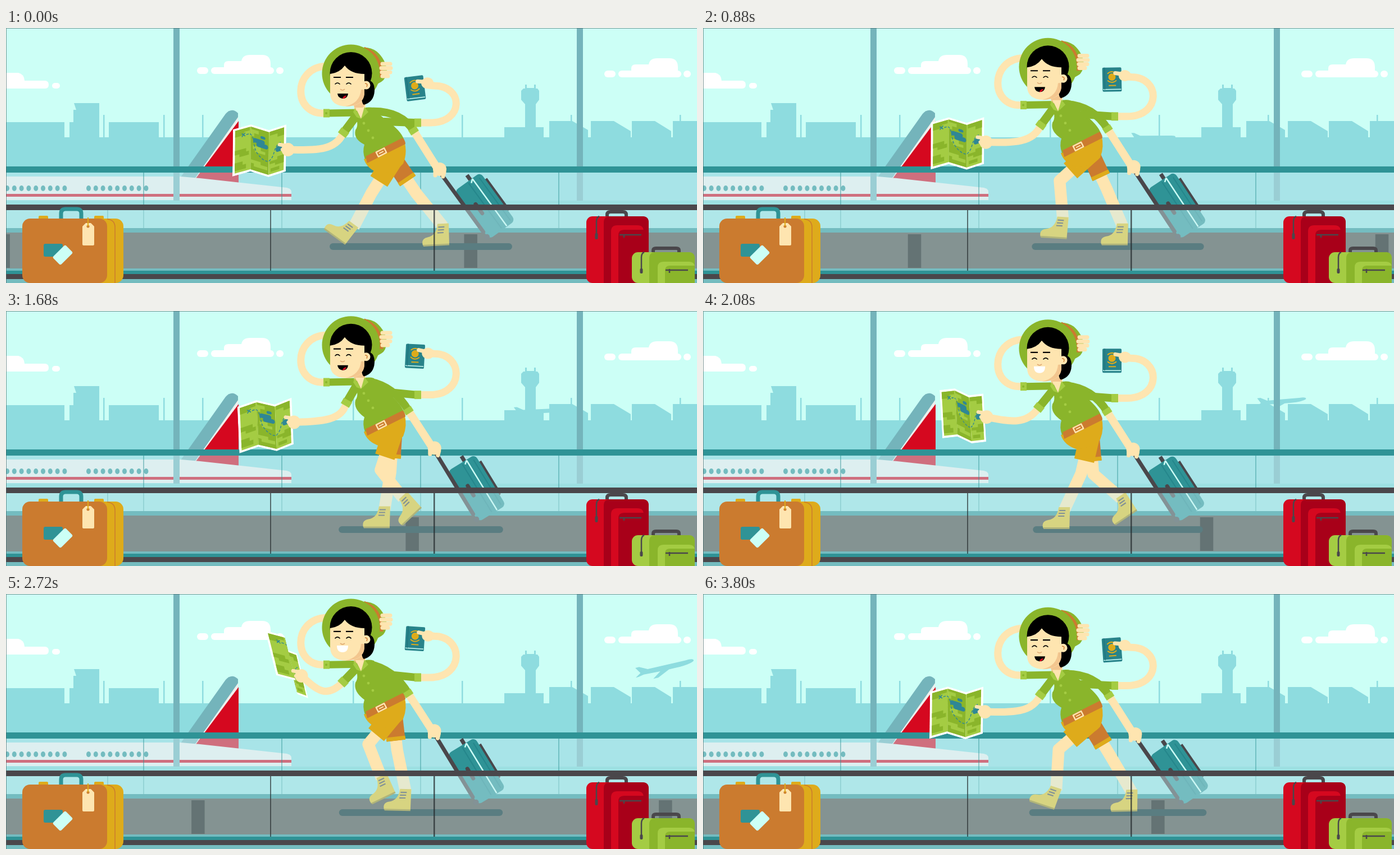
An HTML page that plays this animation: 1230x455 px, repeating every 3.84 s.

```html
<!DOCTYPE html>
<html lang="en">
<head>
<meta charset="utf-8">
<title>Airport walk</title>
<style>
html,body{margin:0;width:100%;height:100%;overflow:hidden;background:#ccfff6}
svg{display:block;width:100vw;height:100vh}
.haze{fill:#8edcdf}.teal{fill:#2f9396}.dark{fill:#4a474b}.skin{fill:#fee5b0}
.green{fill:#8ab52b}.lime{fill:#a4cc43}.gold{fill:#deab1b}.brown{fill:#cb7b2f}
.red{fill:#d5081f}.wine{fill:#a80019}.glass{fill:#c8eef1;opacity:.45}.white{fill:#fff}
.ln{fill:none;stroke-linejoin:round}
.sk{stroke:#fee5b0}.gr{stroke:#8ab52b}.li{stroke:#a4cc43}.dk{stroke:#4a474b}
.round{stroke-linecap:round}
</style>
</head>
<body>
<svg viewBox="0 0 1230 455" preserveAspectRatio="none">
<defs>
  <g id="cloud" class="white">
    <rect x="340" y="70" width="20" height="12" rx="6"/><rect x="365" y="70" width="112" height="12" rx="6"/>
    <path d="M388 72V66Q388 59 396 59H419Q421 48 434 48H456Q471 48 471 64V72Z"/>
    <rect x="481" y="70" width="13" height="12" rx="6"/>
  </g>
  <g id="art">
    <rect width="96" height="84" fill="#fff"/>
    <rect class="lime" x="4" y="4" width="88" height="76"/>
    <rect class="green" x="32" y="4" width="32" height="76"/>
    <g class="green">
      <path d="M4 4H30V10H20V16H4ZM4 40H24V46H29V53H12V48H4ZM4 62H18V68H24V76H4Z"/>
      <path d="M66 4H92V17H80V11H66ZM92 56V66H76V62H66V57H80V52H92ZM68 70H84V76H68Z"/>
    </g>
    <path class="lime" d="M32 8H46V14H38V20H32ZM36 36H50V42H58V47H40V42H36ZM32 62H50V67H62V73H38V68H32Z"/>
    <g fill="#2f8795">
      <rect x="36" y="22" width="21" height="8" rx="4"/><rect x="42" y="28" width="21" height="8" rx="4"/>
      <rect x="49" y="15" width="9" height="5" rx="2.5"/><rect x="77" y="34" width="15" height="10" rx="4"/>
    </g>
    <path class="ln" d="M16 12L22 18M22 12L16 18" stroke="#2f8795" stroke-width="1.6"/>
    <path class="ln" d="M24 16C42 14 34 38 44 48C54 60 68 60 73 46C76 36 78 30 88 28" stroke="#2f8795" stroke-width="1.6" stroke-dasharray="4 2.5"/>
  </g>
  <clipPath id="cell"><rect width="32.3" height="84"/></clipPath>
  <g id="boot">
    <path d="M-10 0H10L9 37H-38Q-41 25 -29 23Q-13 21 -10 0Z" fill="#e3bf24"/>
    <path d="M-38 36H9V39H-37Z" fill="#9d8418"/>
    <path class="ln dk" d="M-9 6H2M-10 11H1M-11 16H0" stroke-width="2.2"/>
  </g>
</defs>

<rect width="1230" height="455" fill="#ccfff6"/>
<g class="white">
  <path d="M0 80H22Q32 82 33 94H70Q76 95 76 101Q76 108 70 108H0Z"/><rect x="82" y="98" width="14" height="10" rx="5"/>
</g>
<use href="#cloud"/><use href="#cloud" x="725" y="6"/>
<g class="haze">
  <path id="plane" d="M-52 -11H-45L-31 -4H38Q54 -5 52 0Q44 5 20 5H6L-16 15H-25L-10 5L-40 4L-50 6H-55L-45 0Z"/>
  <path d="M0 168H104V195H113V168H120V146H125L121 134H166V168H166V195H183V168H272V195H0Z"/>
  <path d="M887 177H924V136L917 128V112L921 108H924V101H927V107H940V101H943V108H946L949 112V128L943 136V177H957V195H887Z"/>
  <path d="M967 166H1008L1036 182V195H967ZM1041 166H1082L1112 184V195H1041ZM1114 166H1155L1184 184V195H1114ZM1187 166H1230V195H1187Z"/>
  <g id="poles"></g>
  <rect y="195" width="1230" height="120"/>
</g>

<path d="M311 266L391 153Q402 141 413 152V164L340 268Z" fill="#74b4bb"/>
<path d="M413 159V276H331Z" fill="#eef0ee"/>
<path class="red" d="M414 166V277L338 268Z"/>
<path d="M0 265H311L345 268L500 285Q508 287 508 292V307H0Z" fill="#eef0ee"/>
<rect class="red" y="296" width="508" height="5"/>
<g id="ports" class="teal"></g>
<g fill="#74b4bb"><rect x="298" width="11" height="308"/><rect x="1016" width="11" height="308"/></g>
<rect class="glass" y="258" width="1230" height="50"/>
<rect y="308" width="1230" height="7" fill="#9de0e2"/>
<rect class="teal" y="247" width="1230" height="11"/>
<rect y="325" width="1230" height="33" fill="#9ae2e2"/>
<g fill="#2f9396" opacity=".45">
  <rect x="244" y="258" width="2" height="99"/><rect x="490" y="258" width="2" height="99"/>
  <rect x="737" y="258" width="2" height="99"/><rect x="983" y="258" width="2" height="99"/>
  <rect x="180" y="325" width="2" height="32"/>
</g>
<rect class="teal" y="357" width="1230" height="8"/>
<rect y="365" width="1230" height="64" fill="#4c4943"/>
<rect class="teal" y="429" width="1230" height="26"/>
<g id="posts" fill="#120f0d"><rect y="368" width="23.5" height="60"/><rect x="832" y="368" width="23.5" height="60"/><rect x="-832" y="368" width="23.5" height="60"/></g>
<rect id="shadow" y="384" height="12" rx="6" fill="#002024"/>

<!-- traveller -->
<g id="case">
  <path class="dark" d="M58 -62H122Q128 -62 128 -57V-54H58Z"/>
  <path class="ln dk" d="M33 -36H52" stroke-width="7"/>
  <rect class="teal" x="43" y="-58" width="106" height="57" rx="8"/>
  <path class="ln" d="M44 -40H148M44 -40L49 -34" stroke="#ccfff6" stroke-width="2.5"/>
  <path class="ln" d="M50 -51H144M46 -30H146" stroke="#25868b" stroke-width="2"/>
  <path class="ln dk round" d="M84 -18H104" stroke-width="7"/>
  <path class="ln dk round" d="M0 0H132" stroke-width="7"/>
  <circle class="dark" cx="143" cy="0" r="5"/>
</g>
<path id="legB" class="ln sk" stroke-width="21"/><use id="bootB" href="#boot"/>
<path id="shortB" class="ln" stroke="#cb7b2f" stroke-width="33"/><path id="cuffB" class="ln" stroke="#deab1b" stroke-width="34"/>
<path id="legA" class="ln sk" stroke-width="21"/><use id="bootA" href="#boot"/>
<path id="shortA" class="ln" stroke="#deab1b" stroke-width="36"/>
<g id="hips">
  <path class="gold" d="M637 234L709 202Q715 222 707 242Q692 259 664 259Q643 252 637 234Z"/>
</g>
<path id="caseSleeve" class="ln gr" stroke-width="14"/><path id="caseArm" class="ln sk" stroke-width="14"/><path id="caseCuff" class="ln li" stroke-width="16"/>
<g id="caseHand"><circle class="skin" cx="0" cy="-5" r="12"/><path class="ln sk round" d="M-8 0V6M8 0L6 8" stroke-width="7"/></g>

<g id="hatArm">
  <path class="ln sk" d="M568 152C510 156 510 70 570 68" stroke-width="13"/>
  <path class="ln gr" d="M628 151L572 152" stroke-width="13"/><path class="ln li" d="M576 152H565" stroke-width="15"/>
  <circle class="green" cx="570" cy="152" r="2"/>
</g>
<path id="sleeve" class="ln gr round" stroke-width="15"/>
<g id="neck"><path class="skin" d="M619 128H640V150L632 164L620 148Z"/><path d="M619 138Q634 134 639 124V138Q632 146 622 146Z" fill="#f3c68f"/></g>
<path id="torso" class="green"/>
<g id="chest">
  <path class="skin" d="M622 142H640L632 162Z"/>
  <path class="lime" d="M621 143L632 162L624 159L618 150ZM638 141L645 150L632 162Z"/>
  <g class="lime"><circle cx="637" cy="170" r="2.4"/><circle cx="645" cy="183" r="2.4"/><circle cx="653" cy="196" r="2.4"/></g>
</g>
<g id="belt">
  <path class="brown" d="M640 229L706 196Q711 201 711 207L643 241Z"/>
  <rect class="ln" x="-8" y="-4.5" width="16" height="9" transform="translate(668 222)rotate(-27)" stroke="#fee5b0" stroke-width="2.5"/>
  <path class="ln sk" d="M664 224L672 220" stroke-width="2"/>
</g>
<path id="passSleeve" class="ln gr" stroke-width="14"/><path id="passArm" class="ln sk" stroke-width="13"/><path id="passCuff" class="ln li" stroke-width="15"/>
<g id="pass">
  <rect x="711" y="86" width="34" height="43" rx="2" fill="#28838a"/>
  <path d="M712 125H744" stroke="#ccfff6" stroke-width="1.5"/><path d="M715 86V125" stroke="#1f747c" stroke-width="1.5"/>
  <circle class="gold" cx="728" cy="103" r="6.5"/>
  <path class="ln" d="M720 97Q728 90 736 97M720 109Q728 116 736 109M722 118H735" stroke="#deab1b" stroke-width="2"/>
  <path class="ln sk round" d="M734 96L746 98" stroke-width="7"/><ellipse class="skin" cx="751" cy="101" rx="11" ry="10"/>
</g>

<g id="head">
  <path class="green" d="M628 36Q646 32 660 42Q676 56 678 76Q676 92 668 96L640 112Z"/>
  <path class="ln" d="M637 37Q668 48 668 88" stroke="#cb7b2f" stroke-width="7"/>
  <circle class="green" cx="614" cy="81" r="51.5"/>
  <path d="M632 96Q656 86 656 112Q655 132 637 137Q631 134 632 96Z"/>
  <circle cx="614" cy="80.5" r="37.5"/>
  <path class="skin" d="M577 82Q594 80 603 67Q614 82 638 82V116Q636 139 606 140Q577 139 577 116Z"/>
  <path d="M638 110V118Q636 139 604 140Q630 134 632 110Z" fill="#f3c68f"/>
  <circle class="skin" cx="641" cy="102" r="7.5"/><path class="ln" d="M639 99Q645 99 642 105" stroke="#cb7b2f" stroke-width="1.5"/>
  <path class="ln" d="M583 88H596M605 88H618" stroke="#000" stroke-width="2.2"/>
  <path class="ln round" d="M586 100Q590 96 594 100M606 100Q610 96 614 100" stroke="#000" stroke-width="1.6"/>
  <path class="ln" d="M595 109Q599 113 603 109" stroke="#e0ab75" stroke-width="1.6"/>
  <g id="laugh"><path d="M590 117H609Q608 126 599 126Q591 125 590 117Z"/><path class="red" d="M599 125Q602 120 606 121Q604 126 599 126Z"/></g>
  <path id="smile" class="white" d="M589 113H609Q609 125 599 125Q589 125 589 113Z"/>
</g>
<path id="fingers" class="ln sk round" d="M670 64H684M668 71.5H685M669 79H684M670 86H680" stroke-width="7"/>

<g id="map"></g>
<path id="mapArm" class="ln sk" stroke-width="13"/><path id="mapCuff" class="ln li" stroke-width="17"/>
<g id="mapHand"><ellipse class="skin" cx="0" cy="0" rx="11.5" ry="12"/><path class="ln sk round" d="M-3 -7L-15 -9M-4 -1L-10 0" stroke-width="6.5"/></g>

<!-- front glass and rails -->
<rect class="glass" y="325" width="1230" height="108"/>
<g fill="#242a2c"><rect x="470" y="325" width="2" height="108" opacity=".65"/><rect x="761" y="325" width="2.5" height="108" opacity=".75"/></g>
<rect class="dark" y="315" width="1230" height="10"/>
<rect class="teal" y="433" width="1230" height="6"/><rect class="dark" y="439" width="1230" height="9"/><rect y="448" width="1230" height="7" fill="#74bcbf"/>

<!-- luggage -->
<rect class="gold" x="130" y="340" width="79" height="115" rx="14"/><path class="ln" d="M180 341Q194 342 194 356V455" stroke="#cb7b2f" stroke-width="1.5"/>
<path class="gold" d="M58 342V337Q58 335 60 335H73Q75 335 75 337V342ZM157 342V337Q157 335 159 335H172Q174 335 174 337V342Z"/>
<path class="ln" d="M98 341V331Q98 323 106 323H126Q134 323 134 331V341" stroke="#2f9396" stroke-width="7"/>
<rect class="brown" x="29" y="340" width="151" height="115" rx="14"/>
<rect class="teal" x="67" y="385" width="34" height="23" rx="3"/>
<rect x="-16" y="-10" width="32" height="20" rx="3" transform="translate(101 405)rotate(-45)" fill="#ccfff6"/>
<path class="skin" d="M136 354L142 348H151L157 354V386Q157 388 155 388H138Q136 388 136 386Z"/>
<circle class="brown" cx="146" cy="354" r="2.5"/><path class="ln" d="M146 338V354" stroke="#deab1b" stroke-width="2"/>
<path class="ln dk" d="M1070 337V333Q1070 328 1076 328H1098Q1104 328 1104 333V337" stroke-width="6"/>
<rect class="red" x="1033" y="336" width="111" height="119" rx="11"/>
<path class="wine" d="M1064 455V347Q1064 336 1075 336H1133Q1144 336 1144 347V455Z"/>
<path class="red" d="M1077 455V363Q1077 352 1088 352H1124Q1135 352 1135 363V455Z"/>
<path class="wine" d="M1090 455V370Q1090 360 1100 360H1135V455Z"/>
<path class="ln dk" d="M1056 336Q1051 338 1051 346V376M1092 369H1131M1100 369V374" stroke-width="2.5"/><rect class="dark" x="1048.5" y="366" width="5" height="11" rx="2"/>
<path class="ln dk" d="M1152 401V397Q1152 393 1157 393H1193Q1198 393 1198 397V401" stroke-width="6"/>
<rect class="lime" x="1114" y="400" width="112" height="55" rx="11"/>
<path class="green" d="M1145 455V411Q1145 400 1156 400H1215Q1226 400 1226 411V455Z"/>
<path class="lime" d="M1160 455V427Q1160 417 1170 417H1216Q1226 417 1226 427V455Z"/>
<path class="green" d="M1173 455V433Q1173 424 1182 424H1226V455Z"/>
<path class="ln dk" d="M1136 400Q1131 402 1131 409V436M1174 432H1214M1181 430V437" stroke-width="2.5"/><rect class="dark" x="1128.5" y="429" width="5" height="9" rx="2"/>
<path d="M0 .5H1230M.5 0V455" stroke="#4f6f70" stroke-width="1" opacity=".7"/>
</svg>
<script>
const LOOP = 3840, STRIDE = 960;
const el = id => document.getElementById(id);
const set = (id, name, v) => el(id).setAttribute(name, v);
const draw = (id, d) => set(id, 'd', d);
const move = (id, x, y, extra = '') => set(id, 'transform', `translate(${x} ${y})${extra}`);
const line = (a, b) => `M${a}L${b}`;
const mix = (a, b, f) => a.map((v, i) => v + (b[i] - v) * f);
// point at distance d from a towards b
const reach = (a, b, d) => mix(a, b, d / Math.hypot(b[0] - a[0], b[1] - a[1]));

// monotone cubic through keys [time, ...values]
function track(keys, t, loop) {
  const n = keys.length;
  const at = j => {
    if (!loop) return keys[Math.max(0, Math.min(n - 1, j))];
    const c = Math.floor(j / n), k = keys[j - c * n];
    return [k[0] + c * loop, ...k.slice(1)];
  };
  let i = 0;
  while (i < n - 1 && keys[i + 1][0] <= t) i++;
  const a = at(i), b = at(i + 1), h = b[0] - a[0];
  if (!h) return a.slice(1);
  const u = (t - a[0]) / h;
  const slope = (j, d) => {
    const p = at(j - 1), q = at(j), r = at(j + 1);
    const l = (q[d] - p[d]) / (q[0] - p[0]), m = (r[d] - q[d]) / (r[0] - q[0]);
    return l * m > 0 ? 2 * l * m / (l + m) : 0;
  };
  return a.slice(1).map((v, k) => {
    const d = k + 1, w = b[d] - v;
    const s = h * slope(i, d), e = h * slope(i + 1, d);
    return v + u * (s + u * (3 * w - 2 * s - e + u * (s + e - 2 * w)));
  });
}

const bob = [[0, 0], [160, .64], [290, 1], [320, .96], [440, .27]];
// time, knee, ankle, boot angle
const step = [
  [0, 650, 295, 619, 350, 36], [160, 673, 290, 643, 350, 0], [280, 690, 285, 692, 348, 0],
  [320, 696, 278, 711, 348, 1], [440, 727, 292, 763, 349, -1], [480, 731, 296, 778, 349, -3],
  [640, 695, 291, 744, 329, -34], [760, 654, 278, 687, 329, -45], [800, 645, 268, 669, 324, -26],
  [920, 633, 277, 629, 345, 18]
];
// four top corners, side vector, cuff, bend, hand
const far = [404, 181, 436, 172, 468, 182, 499, 172, -1, 84, 600, 188, 586, 219, 502, 217];
const near = [425, 202, 457, 189, 490, 195, 519, 183, 9, 83, 609, 192, 606, 220, 525, 226];
const read = [461, 90, 495, 99, 499, 124, 518, 131, 20, 80, 599, 183, 570, 212, 526, 171];
const fling = far.map((v, i) => i < 8 && i % 2 == 0 ? v - 57 : i == 14 ? v - 54 : i == 12 ? v - 12 : v);
const reading = [
  [0, ...far], [480, ...near], [960, ...far],
  [1240, 431, 192, 457, 183, 483, 193, 511, 184, 4, 87, 607, 204, 598, 231, 514, 227],
  [1440, ...near], [1900, ...far],
  [2080, 421, 158, 448, 155, 473, 167, 499, 164, 5, 86, 597, 190, 576, 220, 505, 206],
  [2400, ...read], [3360, ...read], [3560, ...fling], [3780, ...far]
];
const flight = [
  [0, 668, 203, 0, .72], [480, 741, 198, 0, .74], [1240, 860, 192, -1, .77],
  [2080, 1030, 161, -5, .83], [2720, 1173, 131, -13, 1], [3040, 1262, 106, -15, 1.06], [3840, 1500, 30, -15, 1.1]
];

el('poles').innerHTML = [174, 281, 350, 618, 812, 1006, 1200].map(x => `<rect x="${x - 1}" y="155" width="2.5" height="42"/>`).join('');
el('ports').innerHTML = Array.from({length: 18}, (_, i) =>
  `<ellipse cx="${i % 9 * 12.8 + (i < 9 ? 2 : 147)}" cy="286" rx="4" ry="5"/>`).join('');
el('map').innerHTML = [2, 1, 0].map(i =>
  `<g id="fold${i}"><g clip-path="url(#cell)"><use href="#art" x="${-32 * i}"/></g></g>`).join('');

function leg(side, t, hip) {
  const [kx, ky, ax, ay, r] = track(step, t % STRIDE, STRIDE);
  const knee = [kx, ky], cuff = reach(hip, knee, 47);
  draw('leg' + side, `M${hip}L${knee}L${ax} ${ay + 5}`);
  move('boot' + side, ax, ay, `rotate(${r})`);
  draw('short' + side, line(hip, cuff));
  if (side == 'B') draw('cuffB', line(reach(hip, knee, 40), cuff));
}

function mapArm(t, dy, shoulder) {
  const p = track(reading, t, LOOP), pt = i => [p[i], p[i + 1] + dy];
  for (let i = 0; i < 3; i++) {
    const a = pt(2 * i), b = pt(2 * i + 2);
    set('fold' + i, 'transform', `matrix(${(b[0] - a[0]) / 32} ${(b[1] - a[1]) / 32} ${p[8] / 84} ${p[9] / 84} ${a})`);
  }
  const cuff = pt(10), bend = pt(12), hand = pt(14);
  draw('sleeve', line(shoulder, reach(cuff, shoulder, 6)));
  draw('mapCuff', line(reach(cuff, shoulder, 7), reach(cuff, shoulder, -4)));
  draw('mapArm', `M${cuff}C${bend} ${mix(bend, hand, .4)} ${hand}`);
  move('mapHand', ...hand);
}

function render(t) {
  const k = track(bob, t % 480, 480)[0];
  const top = -25 * k, low = -20 * k;
  const [px, py, pr, ps] = track(flight, t);
  move('plane', px, py, `rotate(${pr})scale(${ps})`);
  move('posts', (815 + t * 1664 / LOOP) % 832, 0);
  set('shadow', 'x', 576 + 17.5 * k);
  set('shadow', 'width', 325 - 35 * k);

  const hip = [689, 234 + low];
  leg('B', t + STRIDE / 2, hip);
  leg('A', t, hip);
  move('hips', 0, low);
  move('belt', 0, low);
  move('chest', 0, top);
  draw('torso', `M619 ${150 + top}Q640 ${138 + top} 655 ${143 + top}C664 ${160 + top} 700 ${174 + low} 709 ${200 + low}
    L639 ${234 + low}Q634 ${220 + low} 638 ${208 + low}Q618 ${198 + top} 622 ${182 + top}Q630 ${172 + top} 619 ${150 + top}Z`);

  for (const id of ['head', 'neck']) move(id, 0, -22 * k);
  for (const id of ['hatArm', 'fingers']) move(id, 0, -27 * k);
  const grin = t >= 1800 && t < 3450;
  set('smile', 'visibility', grin ? 'visible' : 'hidden');
  set('laugh', 'visibility', grin ? 'hidden' : 'visible');

  const y1 = 169 - 21 * k, y2 = 103 - 29 * k;
  draw('passSleeve', `M672 ${167 + top}L730 ${y1}`);
  draw('passCuff', `M727 ${y1}H739`);
  draw('passArm', `M736 ${y1}H755C816 ${y1} 815 ${y2} 762 ${y2}L752 ${y2 - 1}`);
  move('pass', 0, -29 * k, `rotate(${-7 + 11 * k} 728 107)`);

  const cuff = [726 - 10 * k, 184 - 6 * k], hand = [772 - 10 * k, 257 - 8 * k];
  draw('caseSleeve', `M646 ${149 + top}Q${702 - 12 * k} ${146 - 13 * k} ${cuff}`);
  draw('caseArm', line(cuff, hand));
  draw('caseCuff', line(reach(cuff, hand, -6), reach(cuff, hand, 4)));
  move('caseHand', ...hand);
  move('case', ...hand, `rotate(${54 + 5 * k})`);
  mapArm(t, -26 * k, [624, 156 + top]);
}

function frame(now) {
  render(now % LOOP);
  requestAnimationFrame(frame);
}
render(0);
requestAnimationFrame(frame);
</script>
</body>
</html>
```
